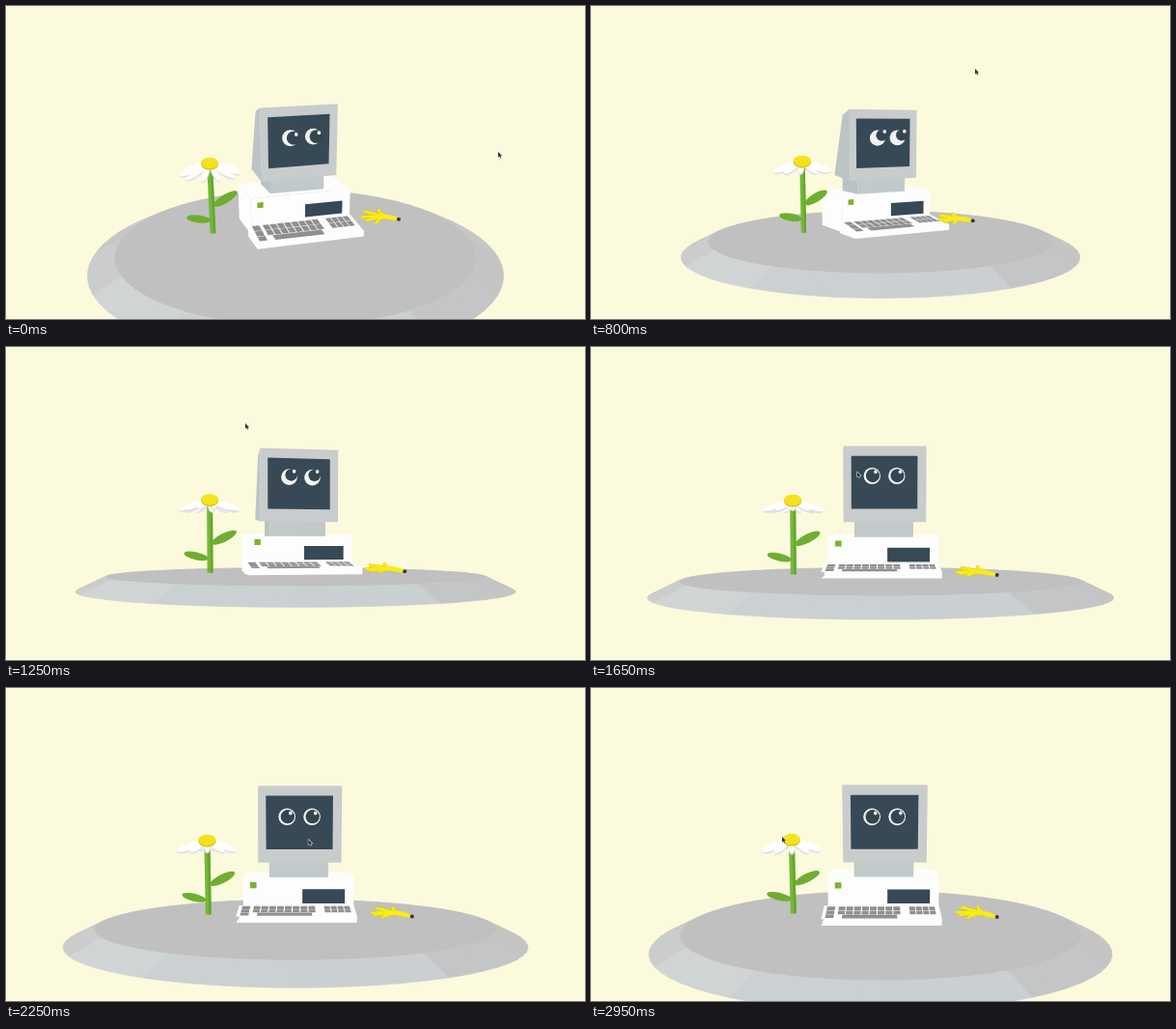
These frames come from a looping animation (600 px wide and 324 px high, 3000 ms). An HTML page with a canvas:

```html
<!DOCTYPE html>
<html>
<head>
<meta charset="utf-8">
<style>
html, body { margin: 0; width: 100%; height: 100%; overflow: hidden; background: #fcfadc; }
canvas { display: block; }
</style>
</head>
<body>
<canvas id="stage" width="600" height="324"></canvas>
<script>
const ctx = document.getElementById('stage').getContext('2d');
const LOOP = 3000, STEP = 50, DISTANCE = 700;
const WHITE = '#fdfdfd', DARK = '#374955', CASE = '#c8cccd';
const { sin, cos, PI, hypot, atan2, max, min, floor } = Math;

// Smooth motion through [time, value] keys without overshoot.
function track(...keys) {
  const rate = i => (keys[i + 1][1] - keys[i][1]) / (keys[i + 1][0] - keys[i][0]);
  const tangent = i => {
    if (i === 0) return rate(0);
    if (i === keys.length - 1) return rate(i - 1);
    const a = rate(i - 1), b = rate(i);
    return a * b <= 0 ? 0 : 2 * a * b / (a + b);
  };
  return t => {
    const i = keys.findIndex((key, n) => n === keys.length - 2 || t < keys[n + 1][0]);
    const [t0, p] = keys[i], [t1, q] = keys[i + 1];
    const span = t1 - t0, s = min(1, (t - t0) / span);
    return p + (q - p) * s * s * (3 - 2 * s) +
      span * s * (1 - s) * ((1 - s) * tangent(i) - s * tangent(i + 1));
  };
}

// Camera orbit in degrees, pointer in pixels
const yawAt = track([0, 18], [450, 26], [800, 28], [1250, 11], [1650, 0], [2950, 0]);
const pitchAt = track([0, 19.9], [450, 13.1], [800, 9.4], [1250, 2.5], [2000, 5.6], [2550, 10.4], [2950, 11.6]);
const pointerX = track([0, 510], [450, 505], [800, 398], [1250, 248], [2000, 305], [2550, 318], [2950, 198]);
const pointerY = track([0, 151], [450, 135], [800, 65], [950, 61], [1250, 79], [2000, 158], [2550, 155], [2950, 154]);

// Returns a projection from scene space (x right, y up, z to the viewer) to the stage.
function camera(yaw, pitch, zoom, floorY) {
  return (x, y, z) => {
    const side = x * cos(yaw) + z * sin(yaw);
    const near = z * cos(yaw) - x * sin(yaw);
    const k = zoom * DISTANCE / (DISTANCE - near * cos(pitch) - y * sin(pitch));
    return [300 + k * side, floorY - k * (y * cos(pitch) - near * sin(pitch)), k];
  };
}

function poly(points, fill, seam) {
  ctx.beginPath();
  points.forEach(([x, y]) => ctx.lineTo(x, y));
  ctx.closePath();
  ctx.fillStyle = fill;
  ctx.fill();
  if (seam) {
    ctx.strokeStyle = fill;
    ctx.lineWidth = seam;
    ctx.stroke();
  }
}

function oval(x, y, rx, ry, fill, turn = 0) {
  ctx.fillStyle = fill;
  ctx.beginPath();
  ctx.ellipse(x, y, rx, ry, turn, 0, 7);
  ctx.fill();
}

// Oval blade running from one point to another.
function blade([x1, y1], [x2, y2], width, fill) {
  const dx = x2 - x1, dy = y2 - y1;
  oval((x1 + x2) / 2, (y1 + y2) / 2, hypot(dx, dy) / 2, width / 2, fill, atan2(dy, dx));
}

// Upright rectangle facing the front.
function panel(at, x0, x1, y0, y1, z, fill) {
  poly([at(x0, y1, z), at(x1, y1, z), at(x1, y0, z), at(x0, y0, z)], fill);
}

function box(at, x0, x1, y0, y1, z0, z1, front, left) {
  poly([at(x0, y1, z0), at(x0, y1, z1), at(x0, y0, z1), at(x0, y0, z0)], left);
  poly([at(x0, y1, z0), at(x1, y1, z0), at(x1, y1, z1), at(x0, y1, z1)], front);
  panel(at, x0, x1, y0, y1, z1, front);
}

function drawDisc(at) {
  const shades = ['#c4c4c4', '#c3c5c6', '#cacfd2', '#cbd0d2', '#d0d4d5', '#cbcccc'];
  const count = 72;
  const rim = (i, r, y) => at(r * cos(i * 2 * PI / count), y, 42 + r * sin(i * 2 * PI / count));
  const top = [];
  for (let n = 0; n < count; n++) {
    const i = n + count / 2;
    const shade = shades[floor(n * 12 / count) - 6] || '#c6c6c6';
    poly([rim(i, 215, -13), rim(i + 1, 215, -13), rim(i + 1, 188, 0), rim(i, 188, 0)], shade, 0.7);
    top.push(rim(i, 188, 0));
  }
  poly(top, '#c0c0c0');
}

function drawKeyboard(at) {
  const on = (u, v) => at(-57 + 116 * u, 12 - 6 * v, 14 + 38 * v);
  const [backL, backR, frontR, frontL] = [on(0, 0), on(1, 0), on(1, 1), on(0, 1)];
  poly([backL, backR, frontR, at(59, 0, 52), at(-57, 0, 52), at(-57, 0, 14)], WHITE);
  poly([backL, backR, frontR, frontL], WHITE);
  const key = (u, v, w, h) =>
    poly([on(u, v), on(u + w, v), on(u + w, v + h), on(u, v + h)], '#8f8f8f');
  const block = (u, width, columns) => {
    const w = width / columns;
    for (let row = 0; row < 2; row++)
      for (let c = 0; c < columns; c++) key(u + c * w, 0.06 + row * 0.3, w * 0.86, 0.28);
  };
  block(0.03, 0.08, 1);
  block(0.13, 0.54, 8);
  key(0.03, 0.66, 0.07, 0.24);
  key(0.17, 0.66, 0.46, 0.26);
  block(0.74, 0.23, 4);
}

function drawMonitor(at, yaw, mouseY) {
  box(at, -27, 34, 39, 58, -44, -4, '#c2c9cb', '#bac2c4');
  poly([at(-38, 132, 0), at(-38, 126, -18), at(-38, 58, -42), at(-38, 54.5, 0)], '#bcc4c6');
  panel(at, -38, 47, 54.5, 132, 0, CASE);
  panel(at, -30, 38, 68, 122, 0, DARK);
  const lift = max(-3, min(0, (mouseY - 135) / 25));
  for (const eye of [-8.5, 16.5]) {
    const [x, y, k] = at(eye, 101, 9);
    const px = x + 0.6 + 8 * sin(yaw), py = y + lift, r = (6.9 + lift / 4) * k;
    oval(x, y, 8.5 * k, 8.5 * k, '#f3f3f1');
    oval(px, py, r, r, '#33454f');
    oval(px + 3, py - 3.8, 1.8, 2, '#f3f3f1');
  }
}

function drawComputer(at, yaw, mouseY) {
  box(at, -53, 59, 0, 41, -45, 12, WHITE, WHITE);
  panel(at, 7, 50, 14, 28.5, 12, DARK);
  panel(at, -46, -39.5, 29.5, 35.5, 12, '#78b52c');
  drawKeyboard(at);
  drawMonitor(at, yaw, mouseY);
}

function drawFlower(at) {
  const spot = (dx, y, dz = 0) => at(-91 + dx, y, -6 + dz);
  poly([spot(-3, 72), spot(3, 72), spot(3, 0), spot(-3, 0)], '#74b838');
  poly([spot(0.5, 72), spot(3, 72), spot(3, 0), spot(0.5, 0)], '#66a531');
  blade(spot(2, 31), spot(28, 44), 9, '#6fae30');
  blade(spot(-2, 15), spot(-27, 21), 8, '#6fae30');

  const count = 11;
  const petals = Array.from({ length: count }, (_, i) => 0.3 + i * 2 * PI / count);
  petals.sort((a, b) => sin(a) - sin(b));
  for (const a of petals) {
    const ring = (r, y) => spot(r * cos(a), y, r * sin(a));
    blade(ring(4, 75), ring(31, 65), 7, '#dfdfe6');
    blade(ring(4, 76), ring(31.5, 66.5), 6, '#fefefe');
  }
  const [x, y] = spot(0, 77);
  oval(x, y + 0.5, 9.2, 6.4, '#dccb1a');
  oval(x, y - 0.5, 8.8, 5.6, '#f4e31c');
}

function drawPeel(at) {
  const hub = at(111, 2, 13), bend = at(99, 5, 8);
  const ends = [[101, 8, -2], [85, 7, -4], [79, 3, 2], [81, 2, 11], [88, 1, 20]];
  ctx.lineCap = 'round';
  for (const [color, width] of [['#d6c81c', 3.4], ['#f9ec14', 2.5]]) {
    ctx.strokeStyle = color;
    ctx.lineWidth = width;
    for (const end of ends) {
      ctx.beginPath();
      ctx.moveTo(hub[0], hub[1]);
      ctx.quadraticCurveTo(bend[0], bend[1], ...at(...end).slice(0, 2));
      ctx.stroke();
    }
  }
  const tip = at(118, 1, 16);
  blade(bend, tip, 5, '#f9ec14');
  oval(tip[0], tip[1], 2, 2, '#3c3a2c');
}

function drawPointer(x, y) {
  const arrow = [[0, 0], [0, 6.5], [1.5, 5.2], [2.7, 7.6], [3.8, 7], [2.7, 4.8], [4.6, 4.6]];
  ctx.strokeStyle = '#e6e6e2';
  ctx.lineWidth = 1;
  ctx.beginPath();
  arrow.forEach(([dx, dy]) => ctx.lineTo(x + dx * 0.85, y + dy * 0.85));
  ctx.closePath();
  ctx.stroke();
  ctx.fillStyle = '#2c3338';
  ctx.fill();
}

function draw(now) {
  const t = floor(now % LOOP / STEP) * STEP;
  const yaw = yawAt(t) * PI / 180, pitch = pitchAt(t) * PI / 180;
  const zoom = 1 - 0.2 * sin(yaw);
  const floorY = 169 + 67 * zoom * cos(pitch);
  const at = camera(yaw, pitch, zoom, floorY);
  ctx.fillStyle = '#fcfadc';
  ctx.fillRect(0, 0, 600, 324);
  drawDisc(camera(0, pitch, 1 - 0.3 * sin(yaw), floorY));
  drawComputer(at, yaw, pointerY(t));
  drawFlower(at);
  drawPeel(at);
  drawPointer(pointerX(t), pointerY(t));
  requestAnimationFrame(draw);
}
requestAnimationFrame(draw);
</script>
</body>
</html>
```
